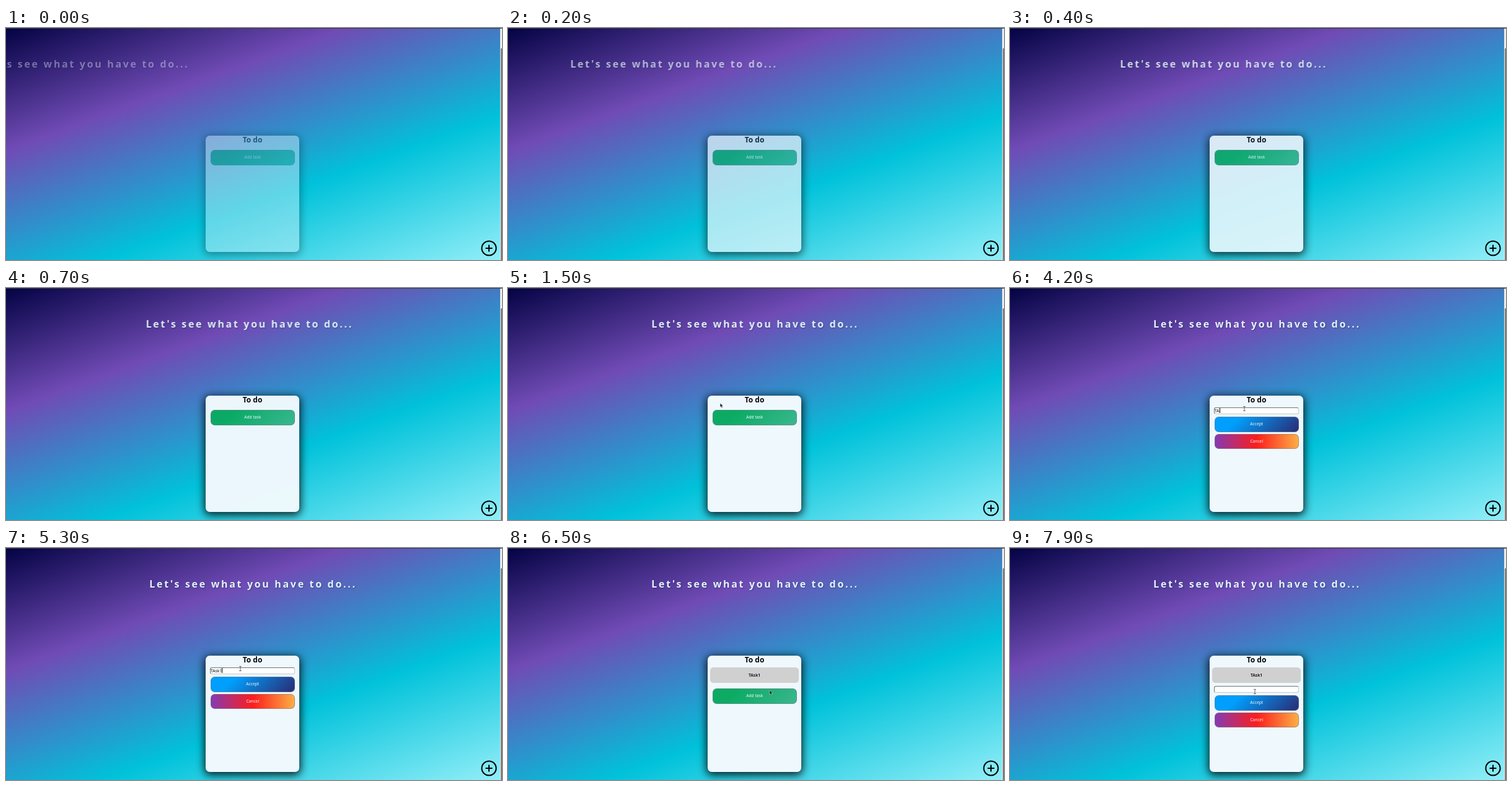
An HTML page for the animation above (8000 ms loop, 800 by 375 pixels).

```html
<!DOCTYPE html>
<html lang="en">
<head>
<meta charset="utf-8">
<title>To do</title>
<style>
  html, body { margin: 0; width: 100%; height: 100%; overflow: hidden; }
  body { font: 6.67px/1 "Noto Sans", "Open Sans", sans-serif; }

  .stage, .stage div, .stage svg { position: absolute; box-sizing: border-box; }
  .stage { width: 800px; height: 375px; overflow: hidden; background: #3a3a3a; }
  .page { left: 0; top: 1px; width: 797px; height: 374px; overflow: hidden; }
  .sky {
    left: 0; top: -36px; width: 797px; height: 410px;
    background: linear-gradient(160deg, #000040 4%, #704bb5 33.3%, #00c2da 66.7%, #92eef8);
  }
  .track { left: 797px; top: 1px; width: 3px; height: 374px; background: #ececec; }
  .thumb { left: 798px; top: 33px; width: 2px; height: 342px; background: #7c7c7c; }

  .title {
    left: 231.3px; top: 46.5px; white-space: nowrap;
    font-size: 16px; font-weight: 700; line-height: 22px; letter-spacing: 2.67px;
    color: #dff4fd; text-shadow: 1px 1px 2px rgba(0, 0, 0, .3);
    animation: slide 8s infinite;
  }
  .card {
    left: 322px; top: 174px; width: 151px; height: 188px; border-radius: 6.67px;
    background: #eff8fc; box-shadow: 0 3px 14px 2px rgba(0, 0, 0, .85);
    animation: fade 8s infinite;
  }
  .head {
    left: 0; top: -1.5px; width: 100%; text-align: center;
    font-size: 12px; font-weight: 700; line-height: 16px; color: #05070c;
  }

  .btn {
    left: 8px; width: 135.5px; height: 24.5px; border-radius: 6.67px;
    border: 1px solid rgba(125, 125, 140, .6); background-origin: border-box;
    text-align: center; line-height: 22.5px; color: #f2f8fa;
  }
  .add { top: 23px; background-image: linear-gradient(315deg, #3bb78f, #0bab64 74%); animation: add 8s step-end infinite; }
  .form { left: 0; top: 0; width: 100%; height: 100%; animation: form 8s step-end infinite; }
  .accept { top: 34px; background-image: linear-gradient(315deg, #2a2a72, #009ffd 74%); }
  .cancel { top: 61.7px; background-image: linear-gradient(90deg, #833ab4, #fd1d1d 50%, #fcb045); }
  .input {
    left: 7px; top: 18.7px; width: 137px; height: 11.3px; border-radius: 3.3px;
    border: 1px solid; border-color: #6f7478 #c4cacd #c4cacd #6f7478; background: #fff;
    line-height: 9.5px; white-space: nowrap; color: #111;
  }
  .typed { left: 0; top: 0; animation: typed 8s step-end infinite; }
  .typed i { font-style: normal; font-size: 0; animation: key 8s var(--at) step-end infinite; }
  .typed b { display: inline-block; width: 1px; height: 8.5px; background: #000; vertical-align: -1.8px; }
  .task {
    left: 4px; top: 18.5px; width: 143px; height: 25px; border-radius: 5.3px;
    background: #d0d0d0; color: #222; font-weight: 700; line-height: 25px; text-align: center;
    animation: task 8s step-end infinite;
  }

  .plus { left: 766px; top: 343px; fill: none; stroke: #000; stroke-width: 2; }
  .mouse { left: 0; top: 0; animation: move 8s linear infinite; }
  .mouse svg { overflow: visible; }
  .arrow { animation: arrow 8s step-end infinite; }
  .beam { animation: beam 8s step-end infinite; }

  @keyframes slide {
    0% { transform: translateX(-271px); opacity: .395; animation-timing-function: cubic-bezier(.167, .464, .405, 1); }
    10.87%, 100% { transform: none; opacity: 1; }
  }
  @keyframes fade {
    0% { opacity: .395; animation-timing-function: cubic-bezier(.167, .464, .405, 1); }
    10.87%, 100% { opacity: 1; }
  }
  @keyframes add {
    0% { opacity: 1; transform: none; }
    27.5% { opacity: 0; transform: none; }
    80% { opacity: 1; transform: translateY(30px); }
    88.75%, 100% { opacity: 0; transform: translateY(30px); }
  }
  @keyframes form {
    0% { opacity: 0; transform: none; }
    27.5% { opacity: 1; transform: none; }
    80% { opacity: 0; transform: translateY(30px); }
    88.75%, 100% { opacity: 1; transform: translateY(30px); }
  }
  @keyframes task { 0% { opacity: 0; } 80%, 100% { opacity: 1; } }
  @keyframes typed { 0% { opacity: 0; } 36.25% { opacity: 1; } 80%, 100% { opacity: 0; } }
  @keyframes key { 0% { font-size: 6.67px; } 30%, 100% { font-size: 0; } }
  @keyframes arrow { 0% { opacity: 0; } 12.5% { opacity: 1; } 32.5% { opacity: 0; } 75% { opacity: 1; } 98.75%, 100% { opacity: 0; } }
  @keyframes beam { 0% { opacity: 0; } 32.5% { opacity: 1; } 75% { opacity: 0; } 98.75%, 100% { opacity: 1; } }
  @keyframes move {
    0%, 12.5% { transform: translate(78px, 11px); }
    18.75% { transform: translate(342px, 186px); }
    21.25%, 27.5% { transform: translate(388px, 207px); }
    33.75%, 73.75% { transform: translate(378px, 195px); }
    75% { transform: translate(382px, 203px); }
    77.5%, 80% { transform: translate(421px, 225px); }
    81.25% { transform: translate(422px, 230px); }
    87.5%, 91.25% { transform: translate(396px, 241px); }
    95%, 97.5% { transform: translate(395px, 237px); }
    98.75%, 100% { transform: translate(395px, 232px); }
  }
</style>
</head>
<body>
<div class="stage">
  <div class="page">
    <div class="sky"></div>
  </div>
  <div class="track"></div>
  <div class="thumb"></div>
  <div class="title">Let's see what you have to do...</div>
  <div class="card">
    <div class="head">To do</div>
    <div class="task">TAsk1</div>
    <div class="btn add">Add task</div>
    <div class="form">
      <div class="input">
        <div class="typed"><i style="--at:4.1s">T</i><i style="--at:4.2s">A</i><i style="--at:4.4s">s</i><i style="--at:4.5s">k</i><i style="--at:5.3s">1</i><b></b></div>
      </div>
      <div class="btn accept">Accept</div>
      <div class="btn cancel">Cancel</div>
    </div>
  </div>
  <svg class="plus" width="26" height="26"><circle cx="13" cy="13" r="11.6"/><path d="M13 7.5v11M7.5 13h11"/></svg>
  <div class="mouse">
    <svg class="arrow" width="6" height="9"><path d="M0 0V6.6L1.5 5.3L2.6 7.7L3.7 7.2L2.7 4.8H4.7Z" fill="#111" stroke="#fff" stroke-width=".4"/></svg>
    <svg class="beam" width="6" height="9"><path d="M-1.8-3.5H1.8M0-3.5V3.5M-1.8 3.5H1.8" fill="none" stroke="#444" stroke-width=".8"/></svg>
  </div>
</div>
</body>
</html>
```
